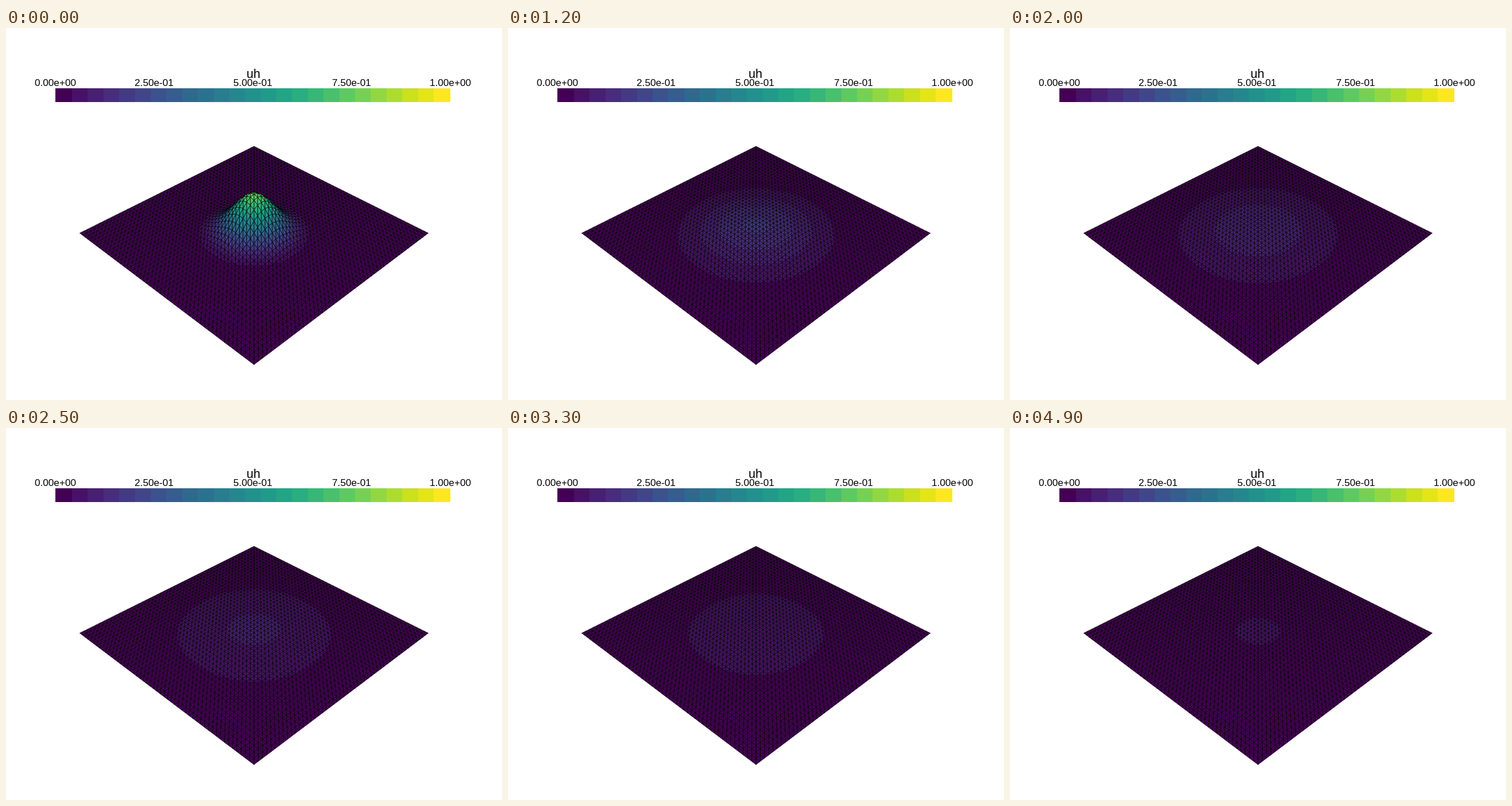
An HTML page with a canvas for the animation above (5 s loop, 864x648 px).

```html
<!DOCTYPE html>
<html lang="en">
<head>
<meta charset="utf-8">
<title>Heat diffusion</title>
<style>
  html, body { margin: 0; width: 100%; height: 100%; overflow: hidden; background: #fff; }
  canvas, svg { position: absolute; left: 0; top: 0; width: 864px; height: 648px; }
  text { font-family: "Liberation Sans", Arial, sans-serif; text-anchor: middle; fill: #000; }
</style>
</head>
<body>
<canvas id="mesh" width="864" height="648"></canvas>
<svg id="bar" viewBox="0 0 864 648"></svg>
<script>
const CELLS = 50, SIDE = CELLS + 1, STEP = 4 / CELLS, DT = 0.02;
const FRAMES = 50, FRAME_MS = 100, BANDS = 25;
const ctx = document.getElementById("mesh").getContext("2d");

// Viridis, resampled to discrete bands
const anchors = ("440154 481a6c 472d7b 424086 3b528b 33638d 2c728e 26828e 21918c " +
  "1fa088 28ae80 3fbc73 5ec962 84d44b addc30 d8e219 fde725").split(" ")
  .map(hex => [0, 2, 4].map(k => parseInt(hex.slice(k, k + 2), 16)));

function bandColor(band) {
  const p = band / (BANDS - 1) * (anchors.length - 1);
  const k = Math.min(Math.floor(p), anchors.length - 2);
  return `rgb(${anchors[k].map((c, n) => Math.round(c + (anchors[k + 1][n] - c) * (p - k)))})`;
}
const colors = Array.from({ length: BANDS }, (_, k) => bandColor(k));

// Value where band k begins; the two end bands are slightly wider
const BAND_SIZE = 0.0398;
const level = k => k === 0 ? 0 : k === BANDS ? 1 : 0.5 + (k - BANDS / 2) * BAND_SIZE;
const bandOf = u => Math.max(0, Math.min(BANDS - 1, Math.floor((u - 0.5) / BAND_SIZE + BANDS / 2)));

function drawBar() {
  const edge = k => Math.round(86 + 688 * level(k));
  let out = "";
  colors.forEach((color, k) => {
    out += `<rect x="${edge(k)}" y="105" width="${edge(k + 1) - edge(k)}" height="24" fill="${color}"/>`;
  });
  ["0.00e+00", "2.50e-01", "5.00e-01", "7.50e-01", "1.00e+00"].forEach((label, k) => {
    out += `<text x="${86 + 172 * k}" y="101.3" font-size="17.2">${label}</text>`;
  });
  out += `<text x="431" y="87" font-size="21.6">uh</text>`;
  document.getElementById("bar").innerHTML = out;
}

// Implicit Euler with linear triangles; the rim stays at zero
function nextField(old) {
  const u = old.slice();
  const mass = 1 / 12, side = mass - DT / STEP ** 2, diag = 0.5 + 4 * DT / STEP ** 2;
  const ring = (f, n) => f[n - 1] + f[n + 1] + f[n - SIDE] + f[n + SIDE];
  const corners = (f, n) => f[n - SIDE - 1] + f[n + SIDE + 1];
  const rhs = new Float64Array(u.length);
  const inside = visit => {
    for (let i = 1; i < CELLS; i++)
      for (let j = 1; j < CELLS; j++) visit(i * SIDE + j);
  };
  inside(n => { rhs[n] = 0.5 * old[n] + mass * (ring(old, n) + corners(old, n)); });
  for (let sweep = 0; sweep < 80; sweep++)
    inside(n => { u[n] = (rhs[n] - side * ring(u, n) - mass * corners(u, n)) / diag; });
  return u;
}

const coord = i => -2 + i * STEP;
function simulate() {
  let u = new Float64Array(SIDE * SIDE);
  for (let i = 1; i < CELLS; i++)
    for (let j = 1; j < CELLS; j++)
      u[i * SIDE + j] = Math.exp(-5 * (coord(i) ** 2 + coord(j) ** 2));
  return Array.from({ length: FRAMES }, () => (u = nextField(u)));
}
const fields = simulate();

// Perspective camera on the (1, 1, 1) diagonal, 30 degree view angle
const peak = Math.max(...fields[0]);
const viewAngle = Math.PI / 12;
const distance = Math.hypot(4, 4, peak) / 2 / Math.sin(viewAngle);
const focal = 324 / Math.tan(viewAngle);

function project(x, y, u) {
  const z = u - peak / 2;
  const scale = focal / (distance - (x + y + z) / Math.sqrt(3));
  return {
    x: 432 + (y - x) / Math.SQRT2 * scale,
    y: 324 - (2 * z - x - y) / Math.sqrt(6) * scale,
    u
  };
}

function clipAbove(points, limit) {
  const out = [];
  points.forEach((a, k) => {
    const b = points[(k + 1) % points.length];
    if (a.u >= limit) out.push(a);
    if ((a.u >= limit) !== (b.u >= limit)) {
      const t = (limit - a.u) / (b.u - a.u);
      out.push({ x: a.x + (b.x - a.x) * t, y: a.y + (b.y - a.y) * t, u: limit });
    }
  });
  return out;
}

function trace(points) {
  points.forEach((p, k) => k ? ctx.lineTo(p.x, p.y) : ctx.moveTo(p.x, p.y));
}

function fillPoly(points, band) {
  ctx.beginPath();
  trace(points);
  ctx.fillStyle = colors[band];
  ctx.fill();
}

function fillTriangle(points) {
  const list = points.map(p => bandOf(p.u));
  const low = Math.min(...list), high = Math.max(...list);
  fillPoly(points, low);
  for (let k = low + 1; k <= high; k++) fillPoly(clipAbove(points, level(k)), k);
}

function strokeLines(...lines) {
  ctx.beginPath();
  lines.forEach(trace);
  ctx.stroke();
}

// Edge lines never reach past the sheet's fixed outline
function clipToSheet() {
  ctx.beginPath();
  trace([project(-2, -2, 0), project(2, -2, 0), project(2, 2, 0), project(-2, 2, 0)]);
  ctx.clip();
}

function drawMesh(field) {
  const pts = Array.from(field, (u, n) =>
    project(coord(Math.floor(n / SIDE)), coord(n % SIDE), u));
  const at = (i, j) => pts[i * SIDE + j];
  ctx.clearRect(0, 0, 864, 648);
  ctx.save();
  clipToSheet();
  ctx.strokeStyle = "#000";
  ctx.lineWidth = 0.95;
  ctx.lineJoin = "round";
  // Back to front; each cell strokes its far edges and its diagonal
  for (let row = 0; row <= 2 * CELLS - 2; row++) {
    for (let i = Math.max(0, row - CELLS + 1); i <= Math.min(row, CELLS - 1); i++) {
      const j = row - i;
      const far = at(i, j), left = at(i + 1, j), right = at(i, j + 1), near = at(i + 1, j + 1);
      fillTriangle([far, left, near]);
      fillTriangle([far, right, near]);
      strokeLines([left, far, right], [far, near]);
    }
  }
  const rim = Array.from({ length: SIDE }, (_, k) => k);
  strokeLines(rim.map(k => at(CELLS, k)), rim.map(k => at(k, CELLS)));
  ctx.restore();
}

drawBar();
const start = performance.now();
let shown = -1;
function tick() {
  const index = Math.floor((performance.now() - start) / FRAME_MS) % FRAMES;
  if (index !== shown) drawMesh(fields[shown = index]);
  requestAnimationFrame(tick);
}
tick();
</script>
</body>
</html>
```
